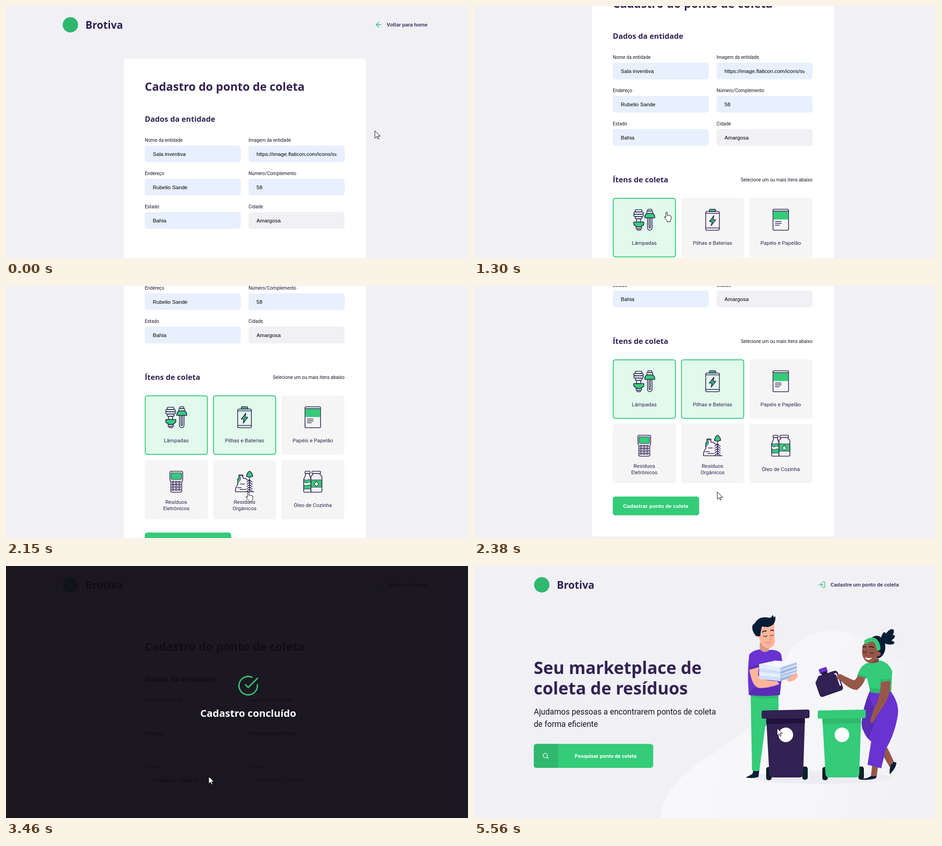
An HTML page that plays this animation: 1012 by 553 pixels, repeating every 6100 ms.

```html
<!DOCTYPE html>
<html lang="pt-BR">
<head>
<meta charset="utf-8">
<title>Cadastro</title>
<style>
html, body { margin: 0; width: 100%; height: 100%; overflow: hidden; background: #f0f0f5; }
svg { display: block; width: 100vw; height: 100vh; cursor: default; }
text { white-space: pre; fill: #322153; }
.h { font-family: "Open Sans", "Noto Sans", sans-serif; font-weight: 700; }
.logo { font-size: 22.6px; }
.h1 { font-size: 25px; }
.h2 { font-size: 16.6px; }
.done { font-size: 22px; fill: #fff; text-anchor: middle; }
.hero { font-size: 37.3px; }
.r { font-family: Roboto, sans-serif; font-size: 11.6px; }
.small { font-size: 10.2px; fill: #1a1426; }
.link { font-weight: 500; }
.lead { font-size: 17.45px; fill: #1c1326; }
.mid { text-anchor: middle; }
.end { text-anchor: end; }
.search { font-weight: 700; fill: #fff; }
.in { font-family: "Liberation Sans", Arial, sans-serif; font-size: 11.6px; fill: #000; }
.send { font-weight: 700; fill: #fff; }
.icon { stroke: #322153; stroke-width: 1.6; stroke-linejoin: round; stroke-linecap: round; fill: none; }
.line { fill: none; stroke-linecap: round; stroke-linejoin: round; }
</style>
</head>
<body>
<svg id="stage" viewBox="0 0 1012 553"></svg>
<script>
const GREEN = '#34cb79', DEEP = '#2fb86e', PLUM = '#322153', VIOLET = '#6833d0', GREY = '#f0f0f5';
const NAVY = '#061d36', SKIN = '#ffb59b', BROWN = '#96574a', FILLED = '#e8f0fe';

const text = (x, y, s, cls) => `<text x="${x}" y="${y}" class="${cls}">${s}</text>`;
const rect = (x, y, w, h, r, fill, more = '') =>
  `<rect x="${x}" y="${y}" width="${w}" height="${h}" rx="${r}" fill="${fill}" ${more}/>`;
const path = (d, fill, more = '') => `<path d="${d}" fill="${fill}" ${more}/>`;
const line = (d, color, w, more = '') =>
  `<path d="${d}" class="line" stroke="${color}" stroke-width="${w}" ${more}/>`;
const disc = (x, y, r, fill) => `<circle cx="${x}" cy="${y}" r="${r}" fill="${fill}"/>`;
const oval = (x, y, rx, ry, turn, fill) =>
  `<ellipse rx="${rx}" ry="${ry}" transform="translate(${x} ${y}) rotate(${turn})" fill="${fill}"/>`;
const group = (id, body) => `<g id="${id}">${body}</g>`;

// Icons are drawn around their own centre.
const box = (x, y, w, h, r = 1.5, fill = 'none') => rect(x, y, w, h, r, fill);
const keys = () => {
  let s = '';
  for (let row = 0; row < 4; row++)
    for (let col = 0; col < 3; col++) s += box(-9.5 + col * 7, -1 + row * 5.6, 4.6, 2.8, 1);
  return s;
};
const icons = [
  box(-20, -22, 15, 5, 2.5) + box(-23, -17, 21, 5, 2.5) + box(-23, -12, 21, 5, 2.5) + box(-20, -7, 15, 5, 2.5) +
    box(-17, -2, 9, 7, 0) + path('M-23 5h22v4q0 3-3 4l-4 3h-8l-4-3q-3-1-3-4z', GREEN) +
    box(-18, 16, 12, 4) + box(-16, 20, 8, 3) + box(7.5, -23, 9, 4) + box(5.5, -19, 13, 5) +
    path('M1-4q0-9 6-10h10q6 1 6 10z', GREEN) +
    path('M7-4v22a5 5 0 0 0 10 0v-22M10.5-4v21a1.5 1.5 0 0 0 3 0v-21', 'none'),
  box(-7, -23, 14, 5, 2, GREEN) + box(-15, -18, 30, 41, 3) + path('M-15-14h30M-15 18h30', 'none') +
    path('M3-9L-7 4h6l-2 9 10-13h-6z', GREEN),
  box(-17, -23, 34, 46, 2.5) + rect(-16.2, -18.5, 32.4, 18, 0, GREEN, 'stroke="none"') +
    path('M-17-19h34M-12 4H1M-12 8H1M-12 12h9', 'none', 'stroke-width="1.4"'),
  path('M-14-20q0-3 3-3h22q3 0 3 3v16l-2 4v20q0 3-3 3h-18q-3 0-3-3v-20l-2-4z', 'none') +
    rect(-11.5, -19.5, 23, 14.5, 1, GREEN, 'stroke-width="1"') + keys(),
  path('M-20 22q0-11 6-17l-1-1v-9l3-5v-5h8v5l2 3q5-2 7 3 6 0 7 4M-20 22H21', 'none') +
    path('M-15-2v5l6-7v-6h-3z', GREEN, 'stroke-width="1"') +
    path('M-13-13h10M-9 5h9M-16 13h9M-10 17h13', 'none') +
    path('M4-12q2-9 7-11 5 2 7 11-7 4-14 0z', GREEN) +
    path('M11-9V22' + [-3, 2, 7, 12, 17].map(y => `M5 ${y + 4}l6-5 6 5`).join(''), 'none'),
  path('M-16-18v4l-4 9v26q0 2 2 2H-4v-29l-3-8v-4z', 'none') + box(-17, -23, 11, 5) +
    path('M-19-5q4 3 7 1t8 0v6q-4-2-8 0t-7-1zM-19 7q4 3 7 1t8 0v8h-15z', GREEN, 'stroke-width="1"') +
    box(-2, -23, 19, 5) + path('M0-18v3q-4 1-4 5v30q0 3 3 3h18q3 0 3-3v-30q0-4-4-5v-3z', GREY) +
    rect(-3.4, -4, 22.8, 16, 0, GREEN, 'stroke-width="1"') +
    path('M8-1q-4 4-4 6a4 4 0 0 0 8 0q0-2-4-6z', '#fff', 'stroke-width="1.3"')
];
const names = ['Lâmpadas', 'Pilhas e Baterias', 'Papéis e Papelão',
  'Resíduos|Eletrônicos', 'Resíduos|Orgânicos', 'Óleo de Cozinha'];

const item = (name, i) => {
  const rows = name.split('|');
  const label = rows.map((s, k) => text(69, (rows.length > 1 ? 96.5 : 103) + k * 13.6, s, 'r mid')).join('');
  return `<g transform="translate(${304 + i % 3 * 149.5} ${603 + (i > 2) * 141.5})">` +
    rect(0, 0, 138.3, 130.5, 5.5, '#f5f5f5') +
    rect(1, 1, 136.3, 128.5, 4.5, '#e1faec', `id="mark${i}" stroke="${GREEN}" stroke-width="2"`) +
    `<g class="icon" transform="translate(69 48)">${icons[i]}</g>${label}</g>`;
};

const labels = ['Nome da entidade', 'Imagem da entidade', 'Endereço', 'Número/Complemento', 'Estado', 'Cidade'];
const values = ['Sala inventiva', 'https://image.flaticon.com/icons/svg', 'Rubelio Sande', '58', 'Bahia', 'Amargosa'];
const fieldX = i => 304 + i % 2 * 227.3;
const fieldY = i => 306 + (i >> 1) * 73;
const fields = labels.map((s, i) => text(fieldX(i), fieldY(i) - 8.2, s, 'r small') +
  rect(fieldX(i), fieldY(i), 210.2, 37, 6, GREY)).join('');
const filled = values.map((s, i) => (i < 5 ? rect(fieldX(i), fieldY(i), 210.2, 37, 6, FILLED) : '') +
  `<g clip-path="url(#clip)">${text(fieldX(i) + 17.5, fieldY(i) + 22.6, s, 'in')}</g>`).join('');

const brand = x => disc(x + 17.5, 41.3, 16.8, DEEP) + text(x + 50.5, 49.6, 'Brotiva', 'h logo');

const form = brand(123.5) + line('M822 41H811M816.5 35.5L811 41l5.5 5.5', DEEP, 1.5) +
  text(834, 45, 'Voltar para home', 'r link') +
  rect(258, 115.5, 530.7, 876.5, 6, '#fff') +
  text(304, 186, 'Cadastro do ponto de coleta', 'h h1') + text(304, 254.3, 'Dados da entidade', 'h h2') +
  fields + group('filled', filled) +
  group('empty', text(321.8, 474.3, 'Selecione o Estado', 'in') +
    `<g opacity=".45">${text(548.8, 474.3, 'Selecione a Cidade', 'in')}</g>`) +
  text(304, 569.3, 'Ítens de coleta', 'h h2') +
  text(741.5, 566.8, 'Selecione um ou mais itens abaixo', 'r small end') +
  names.map(item).join('') +
  rect(304, 904, 189.3, 41.3, 5.5, GREEN, 'id="send"') + text(326.5, 928.8, 'Cadastrar ponto de coleta', 'in send');

const modal = rect(0, 0, 1012, 553, 0, '#0e0a14', 'fill-opacity=".94"') +
  `<g transform="translate(506.3 238.3) scale(2.02)">` +
  line('M22 11.1V12a10 10 0 1 1-5.93-9.14M22 4L12 14l-3-3', GREEN, 1.4) + '</g>' +
  text(530.5, 331, 'Cadastro concluído', 'h done');

const bin = (x, body, band) =>
  rect(x + 10, 441, 12, 29, 5, '#0b1f2a') + rect(x + 89, 440, 12, 29, 5, '#0b1f2a') +
  path(`M${x + 10} 332h85l-4 125q-1 7-8 7H${x + 25}q-7 0-8-7z`, body) +
  path(`M${x + 10} 333h85l-.5 12-84 2z`, band) +
  path(`M${x + 4} 317L${x + 101} 315q4 0 4 4v11q0 4-4 4L${x + 4} 335q-4 0-4-4v-10q0-4 4-4z`, body) +
  disc(x + 53, 370.5, 16, '#fff');

const sheets = [0, 1, 2, 3].map(i => {
  const y = 245 - i * 7.8;
  return path(`M624 ${y - 6}l47 7v7l-46-5z`, i % 2 ? '#e4eefc' : '#cfe0fa') +
    path(`M671 ${y + 1}l36-12v6l-36 13z`, i % 2 ? '#b3c6ea' : '#9fb8e4') +
    path(`M624 ${y - 6}l36-8 46 4-35 11z`, '#f4f8ff');
}).join('');

const man =
  path('M612 448l-2 8q-6 4-15 8 14 3 28-1l2-15z', NAVY) +
  path('M606 280L609 448q8 4 16 1L638 352l29-30V280z', GREEN) + path('M606 280h60v9q-32 4-60-3z', DEEP) +
  path('M626 168h20v18q-10 9-20 0z', '#d89a85') +
  path('M603 194q8-9 23-11 10 11 22 1 19-1 25 10l4 28-7 61q-34 4-68 0-3-40-1-69z', VIOLET) +
  path('M612 266q30 6 58-5v22q-34 4-68 0z', '#5a2cb5') +
  path('M602 225l22-5-2 20q10 12 42 13l5 6q-24 9-44 9-13-3-18-24z', SKIN) +
  path('M601 223l23-6v5l-22 6z', '#5a2cb5') +
  path('M627 140q10-12 31-14l1 40q-2 14-16 14-14-2-18-22z', SKIN) + disc(624, 152, 5, SKIN) +
  path('M618 154q-11-13-8-24 7-6 8-9 10-12 30-7 5-2 6-7l3 6 3-3q2 21-17 24l-12-1q-3 8-4 21z', NAVY) +
  line('M632 145q4-4 8-2M650 142q4-3 6 0', NAVY, 2) +
  line('M634 153q4 4 8 0M649 152q4 3 7-1', '#49232a', 1.2) +
  line('M648 154l3 8h-4M638 167q7 5 13-1', '#d4816e', 1.2) +
  sheets + path('M696 241l9-7q6 3 3 10l-5 6q-10 5-14 3l-5-3z', SKIN);

const jug = '<g transform="translate(776 255.5) rotate(-19)">' +
  rect(-11, -34, 18, 11, 2, VIOLET) + rect(-8, -25, 13, 8, 0, '#21123d') +
  path('M-16-20h35q8 0 8 8v31q0 7-7 7h-41q-6 0-6-7V-8z', PLUM) +
  line('M20-13q3 0 3 4V14', '#f2f2f6', 3) + '</g>';

const woman =
  [[909, 151, 15, 7, -52], [909, 159, 14, 6, -25], [908, 167, 13, 5, 8], [897, 157, 12, 5, -78]]
    .map(p => oval(...p, NAVY)).join('') +
  oval(882, 178, 19, 25, 0, NAVY) +
  path('M903 396l-12 12 20 34 11-8-14-30z', BROWN) + path('M920 430l5 1q1 10-14 26-2-8 2-20z', NAVY) +
  path('M873 430l13 2-4 30-13 3z', BROWN) + path('M870 461l12 0-2 5q-14 4-31 3 4-3 13-4z', NAVY) +
  path('M867 274L912 274q21 28 16 56-7 40-26 72l-10 42-30-8 8-51q-17-12-21-40 2-34 18-71z', VIOLET) +
  path('M867 276q-20 47-17 80l14 24 22-60q-20-14-19-44z', '#5a2cb5') +
  path('M842 236l16 4q-1 18-19 32-17 0-39-24l-5-7 7-4q20 10 31 14 6-4 9-15z', BROWN) +
  path('M868 204h19v12q-9 6-19 0z', '#7d463c') +
  path('M841 237q7-22 25-25 14 4 23-5 20 5 27 24l-2 44q-24 7-46 1l-8-34q-10 2-19-5z', GREEN) +
  path('M868 277q24 5 46-2v-10q-25 8-47 2z', DEEP) + path('M841 237l20 5-1 5-20-6z', DEEP) +
  path('M851 175q9-15 33-6l2 24q-6 19-19 20-15-4-17-23z', BROWN) + disc(886, 193, 5, BROWN) +
  line('M859 166Q882 152 886 181', GREEN, 9) +
  line('M852 178q3-2 6 0M866 178q5-3 9 1', NAVY, 2) +
  line('M852 188q3 3 6 0M867 190q4 3 8 0', '#351819', 1.2) + line('M860 185l-3 10 4 1', '#70392f', 1.2) +
  path('M856 200q7 4 16 1-4 6-9 5-5-1-7-6z', '#fff') +
  path('M891 253l21-2q1 32-13 53l-15 22-10 17q-7 3-6-5l7-21q16-29 16-64z', BROWN) +
  path('M890 249l23-2v5l-23 3z', DEEP);

const home = path('M408 553C414 485 470 446 535 404S635 330 655 282 678 142 790 142C875 145 895 198 946 213 986 229 1006 259 1012 290V553Z', 'url(#glow)') +
  brand(131) +
  line('M763.5 35h4q1 0 1 1v10q0 1-1 1h-4M760 44.5l3.5-3.5-3.5-3.5M763.5 41H755.5', GREEN, 1.4) +
  text(781, 45, 'Cadastre um ponto de coleta', 'r link') +
  text(131, 237, 'Seu marketplace de', 'h hero') + text(131, 281.5, 'coleta de resíduos', 'h hero') +
  text(131, 326, 'Ajudamos pessoas a encontrarem pontos de coleta', 'r lead') +
  text(131, 353.3, 'de forma eficiente', 'r lead') +
  rect(131, 390.5, 261.5, 52.5, 6, GREEN) + path('M137 390.5h47v52.5h-47q-6 0-6-6v-40.5q0-6 6-6z', DEEP) +
  line('M161 416a4.8 4.8 0 1 0-9.6 0 4.8 4.8 0 1 0 9.6 0M159.8 419.5l3 3', '#fff', 1.3) +
  text(220.5, 420.6, 'Pesquisar ponto de coleta', 'r search') +
  oval(760, 464, 155, 14, 0, '#ececf2') +
  man + woman + bin(630, PLUM, '#21123d') + bin(753, GREEN, DEEP) + jug +
  path('M795 239l7-2 9 6-5 8-10-3z', BROWN);

const cursor = path('M0 0v16l4-3.6 2.5 5.4 2.4-1.1-2.4-5.2h5.2z', '#fff', 'id="arrow" stroke="#000"') +
  path('M-1.7 12V1.5a1.5 1.5 0 0 1 3 0V7.5q1.5-1.2 3 .3 1.7-.9 2.8.5 2.2-.4 2.6 1.5v5q-.5 2-2 4.5v2.2H1v-2q-3-3.5-6.5-8 .5-2.5 3.8.5z',
    '#fff', 'id="hand" stroke="#000"');

const $ = id => document.getElementById(id);
$('stage').innerHTML = `<defs>
  <clipPath id="clip"><path d="M258 0H724V1000H258z"/></clipPath>
  <linearGradient id="glow" x1="0" y1=".5" x2="1" y2=".6">
    <stop offset=".1" stop-color="#f8f8fa"/><stop offset=".6" stop-color="#f6f6f9"/><stop offset="1" stop-color="#f0f0f5"/>
  </linearGradient></defs>` +
  rect(0, 0, 1012, 553, 0, GREY) + group('form', form) + group('modal', modal) +
  group('home', home) + group('cursor', cursor);

// Keyframes: time in ms, then values.
const scrollKeys = [[230, 0], [306, 20], [383, 68], [460, 91], [536, 111], [613, 159], [690, 182], [1840, 182],
  [1915, 215], [1991, 263], [2068, 335], [2145, 363], [2222, 363], [2298, 394], [2374, 442], [2451, 454]];
const mouseKeys = [[460, 808, 274], [842, 505, 385], [1072, 422, 452], [1302, 422, 452], [1532, 531, 452],
  [2222, 531, 452], [2298, 533, 452], [2451, 533, 452], [2910, 438.5, 450], [2987, 445.5, 450], [3294, 445.5, 450],
  [3370, 444, 462], [3840, 444, 462], [4366, 664, 356]];

const sample = (list, t) => {
  const i = list.findIndex(k => k[0] > t);
  if (i < 0) return list[list.length - 1].slice(1);
  if (!i) return list[0].slice(1);
  const a = list[i - 1], b = list[i], f = (t - a[0]) / (b[0] - a[0]);
  return a.slice(1).map((v, n) => v + (b[n + 1] - v) * f);
};
const show = (id, on) => $(id).setAttribute('display', on ? 'inline' : 'none');

names.forEach((_, i) => show('mark' + i, false));
$('send').setAttribute('stroke-width', 2);

const STEP = 76.6;
function draw() {
  const t = performance.now() % 6100;
  const tick = Math.floor((t + 7) / STEP) * STEP;
  const sent = t >= 3460, atHome = t >= 5560;
  const scroll = sent ? 0 : Math.round(sample(scrollKeys, tick)[0]);
  const [x, y] = sample(mouseKeys, tick);
  const docY = y + scroll;
  const onItem = x > 304 && x < 742 && docY > 603 && docY < 876;
  const onSend = x > 304 && x < 493 && docY > 904 && docY < 945;
  const hand = (onItem || onSend) && t < 3370;

  show('form', !atHome);
  show('filled', !sent);
  show('empty', sent);
  show('modal', sent && !atHome);
  show('home', atHome);
  show('hand', hand);
  show('arrow', !hand);
  show('mark0', t >= 1220);
  show('mark1', t >= 1610);
  $('form').setAttribute('transform', `translate(0 ${-scroll})`);
  $('cursor').setAttribute('transform', `translate(${x} ${y})`);
  $('send').setAttribute('fill', onSend ? DEEP : GREEN);
  $('send').setAttribute('stroke', t >= 2840 ? '#101010' : 'none');
  requestAnimationFrame(draw);
}
draw();
</script>
</body>
</html>
```
